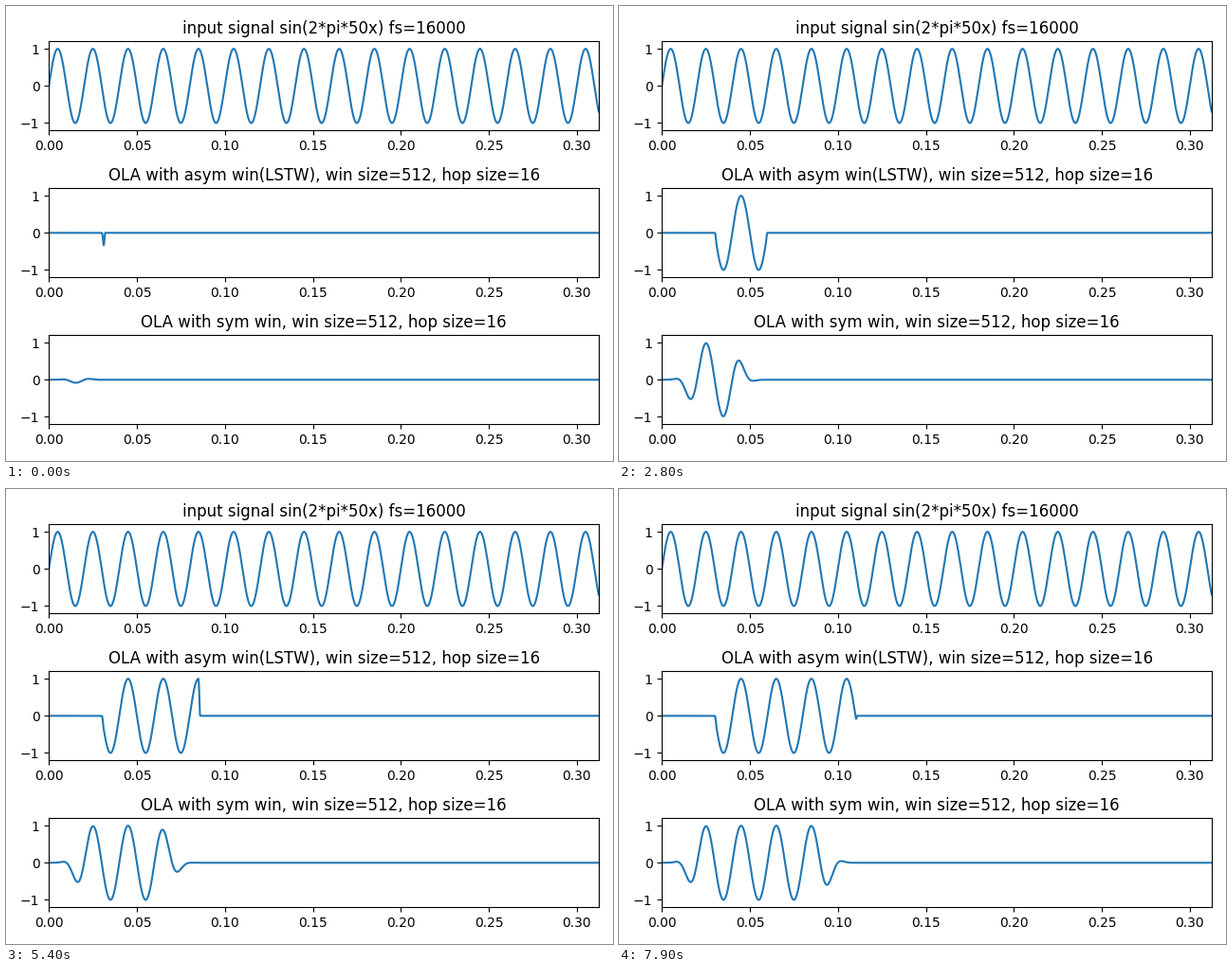
Recreate the animation shown at these times as a matplotlib script. Size 640 by 480 pixels, loop 8 s.

```python
import numpy as np
import matplotlib.pyplot as plt
from matplotlib.animation import FuncAnimation

FS = 16000
N = 5000
WIN = 512
HOP = 16
FRAMES = 80

t = np.arange(N) / FS
signal = np.sin(2 * np.pi * 50 * t)


def hann(size):
    return 0.5 - 0.5 * np.cos(2 * np.pi * np.arange(size) / size)


# Combined analysis * synthesis windows, scaled so the overlaps sum to one.
asym = np.zeros(WIN)
asym[-2 * HOP:] = hann(2 * HOP)
sym = hann(WIN) ** 2
sym /= sym.sum() / HOP


def overlap_add(window, hops):
    gain = np.zeros(N)
    for k in range(hops):
        gain[k * HOP:k * HOP + WIN] += window
    return gain * signal


fig, axes = plt.subplots(3, 1, figsize=(6.4, 4.8), dpi=100)
titles = (
    "input signal sin(2*pi*50x) fs=16000",
    f"OLA with asym win(LSTW), win size={WIN}, hop size={HOP}",
    f"OLA with sym win, win size={WIN}, hop size={HOP}",
)
lines = []
for ax, title in zip(axes, titles):
    ax.set_title(title)
    ax.set_xlim(0, N / FS)
    ax.set_ylim(-1.2, 1.2)
    ax.set_yticks([-1, 0, 1])
    lines += ax.plot(t, signal)
fig.tight_layout()


def update(i):
    for line, window in zip(lines[1:], (asym, sym)):
        line.set_ydata(overlap_add(window, i + 1))
    return lines[1:]


anim = FuncAnimation(fig, update, frames=FRAMES, interval=100,
                     repeat=True, repeat_delay=0)
plt.show()
```
